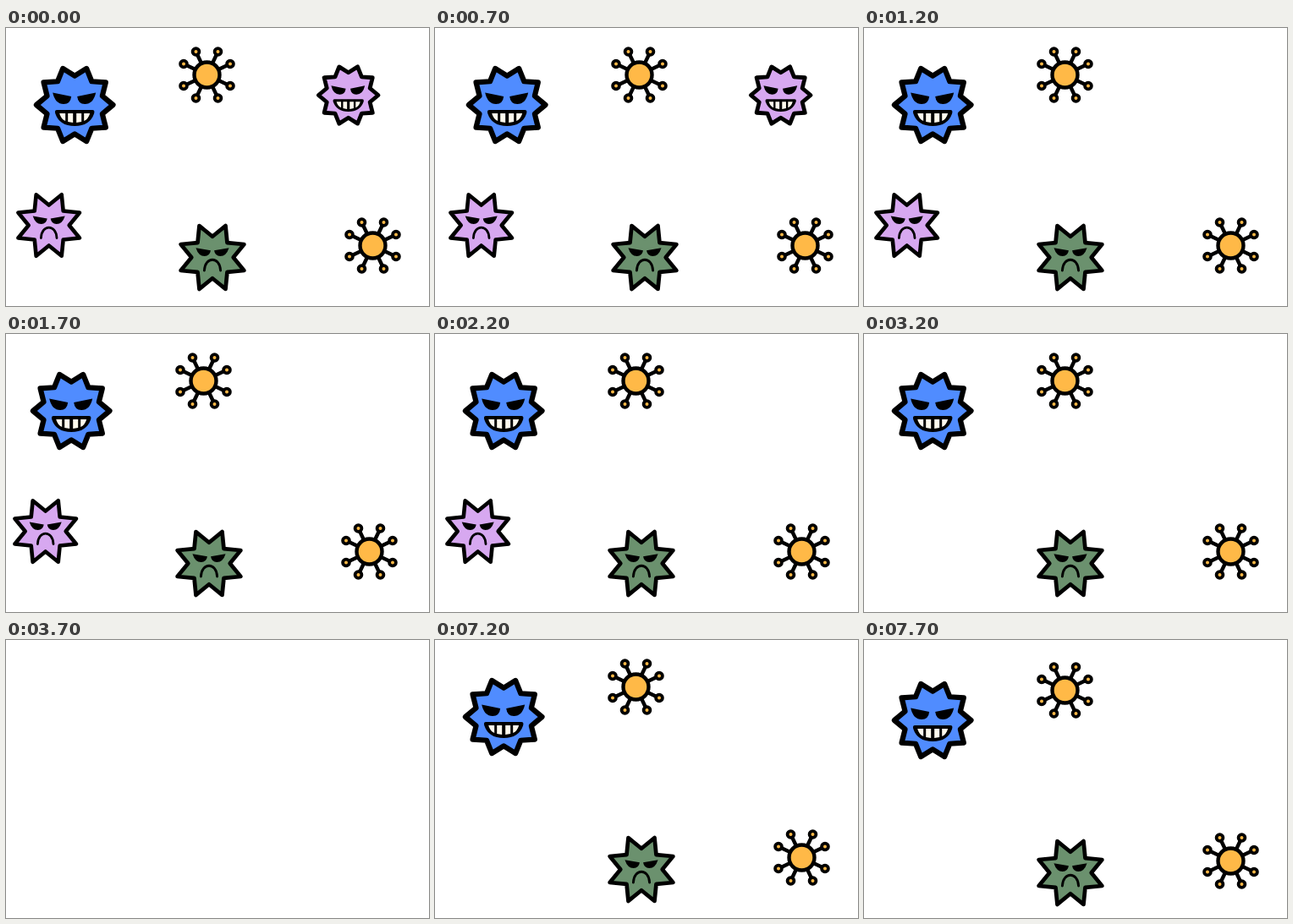
Recreate the animation shown at these times as an HTML page. Size 500 by 329 pixels, loop 8 s.

```html
<!DOCTYPE html>
<html lang="en">
<head>
<meta charset="utf-8">
<title>Germs</title>
<style>
html, body { margin: 0; width: 100%; height: 100%; overflow: hidden; background: #fff; }
svg { display: block; width: 500px; height: 329px; }
</style>
</head>
<body>
<svg viewBox="0 0 500 329">
  <defs>
    <g id="grin">
      <path d="M-26-14.5L-4-10Q-5-1-13-1Q-23-1-26-14.5ZM25-14.5L3-10Q4-1 12-1Q22-1 25-14.5Z"/>
      <path d="M-21 6H21Q24 6 23 10Q18 25 0 25Q-18 25-23 10Q-24 6-21 6Z"/>
      <path fill="#fffbee" d="M-18 10H-11V19Q-16 17-18 10ZM-8 10H-2V21L-8 20ZM2 10H8V20L2 21ZM11 10H18Q16 17 11 19Z"/>
    </g>
    <g id="frown">
      <path d="M-19-11L-2-8Q-3-1.5-9-1.5Q-16-1.5-19-11ZM19-11L2-8Q3-1.5 9-1.5Q16-1.5 19-11Z"/>
      <path d="M-9.3 15C-8.5-1.5 8.5-1.5 9.3 15" fill="none" stroke="#000" stroke-width="2.8" stroke-linecap="round"/>
    </g>
    <g id="spore" stroke="#000"></g>
  </defs>
  <g id="all"></g>
</svg>
<script>
const $ = id => document.getElementById(id);
const polar = (r, a) => [r * Math.cos(a), r * Math.sin(a)].map(v => v.toFixed(2));

function star(tips, outer, inner, turn) {
  return Array.from({ length: tips * 2 }, (_, i) =>
    polar(i % 2 ? inner : outer, turn + i * Math.PI / tips)).join(' ');
}

function germ(id, x, y, scale, color, face) {
  const shape = face === 'grin'
    ? `points="${star(10, 45.3, 34.3, 0)}" stroke-width="6.2"`
    : `points="${star(8, 39.3, 24, Math.PI / 8)}" stroke-width="4.6"`;
  return `<g id="${id}" transform="translate(${x} ${y}) scale(${scale})">
    <polygon ${shape} fill="${color}" stroke="#000" stroke-linejoin="round"/><use href="#${face}"/></g>`;
}

const spore = (x, y) => `<use href="#spore" x="${x}" y="${y}"/>`;

let arms = '', knobs = '';
for (const sx of [-1, 1]) for (const sy of [-1, 1]) for (const [x, y] of [[27.5, 13], [13, 27.5]]) {
  arms += `M0 0L${sx * x} ${sy * y}`;
  knobs += `<circle cx="${sx * x}" cy="${sy * y}" r="3.9" stroke-width="3.8"/>`;
}
$('spore').innerHTML = `<path d="${arms}" stroke-width="4.4"/>
  <g fill="#ffb947">${knobs}<circle r="15" stroke-width="4.4"/></g>`;

$('all').innerHTML =
  germ('blue', 81.2, 91, 1, '#508cff', 'grin') +
  germ('lilac', 404.7, 79.5, .78, '#d7a8f0', 'grin') +
  germ('sad', 50.7, 233.5, 1, '#d7a8f0', 'frown') +
  germ('green', 244, 271.5, 1.03, '#6b916e', 'frown') +
  spore(237.5, 55.5) + spore(433.5, 257.5);

const show = (id, on) => $(id).setAttribute('visibility', on ? 'inherit' : 'hidden');

// nudges: [start, end, dx, dy]
const nudges = [[700, 1200, 4, 0], [1700, 2200, -4, 0], [2700, 3200, 0, 4], [7700, 8000, 0, 4]];

function draw(now) {
  const t = now % 8000;
  const [, , dx, dy] = nudges.find(n => t >= n[0] && t < n[1]) || [0, 0, 0, 0];
  $('all').setAttribute('transform', `translate(${dx} ${dy})`);
  show('all', t < 3700 || t >= 7200);
  show('lilac', t < 1200);
  show('sad', t < 3200);
  requestAnimationFrame(draw);
}
draw(0);
</script>
</body>
</html>
```
